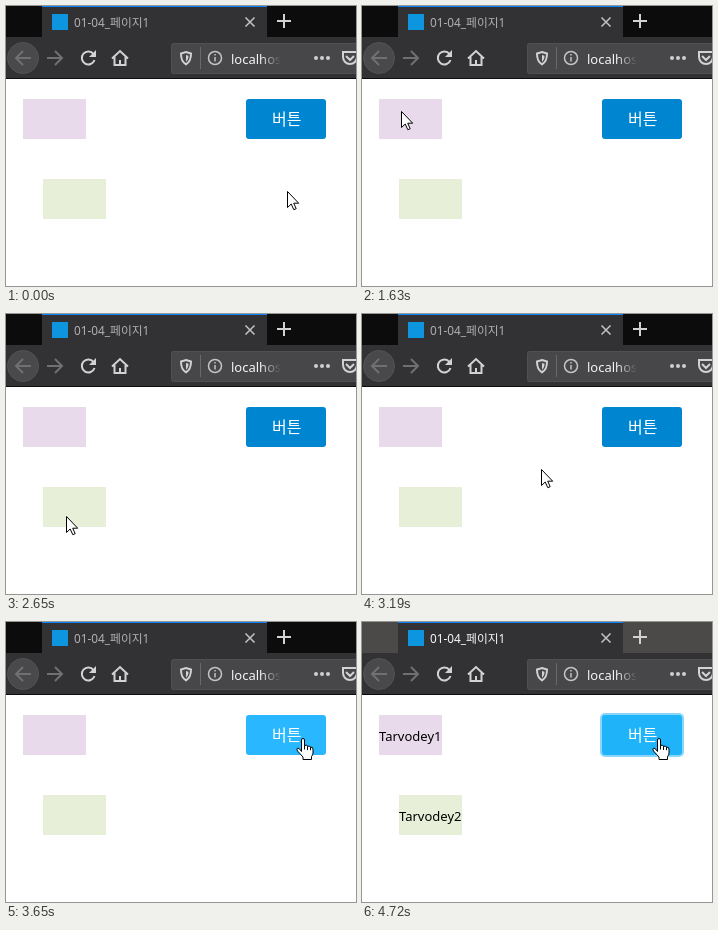
An HTML page for the animation above (6830 ms loop, 350 by 280 pixels).

```html
<!DOCTYPE html>
<html lang="ko">
<head>
<meta charset="utf-8">
<style>
  html, body { margin: 0; width: 100%; height: 100%; overflow: hidden; background: #fff; }
  svg { display: block; width: 350px; height: 280px; }
  text { font-family: "Noto Sans", "Noto Sans CJK KR", "Noto Sans CJK", sans-serif; font-size: 13px; }
  #title { font-size: 11.8px; }
  #caption { font: 16px "Noto Sans CJK KR", "Noto Sans CJK", sans-serif; }
  .icon { fill: none; stroke: #d2d2d4; stroke-width: 2; }
  .dim { stroke: #707072; }
  .thin { stroke: #c4c4c6; stroke-width: 1.5; }
</style>
</head>
<body>
<svg viewBox="0 0 350 280">
  <defs>
    <linearGradient id="fade" gradientUnits="userSpaceOnUse" x1="254" x2="275">
      <stop stop-color="#f4f4f5"/>
      <stop offset="1" stop-color="#f4f4f5" stop-opacity="0"/>
    </linearGradient>
  </defs>

  <!-- tab strip -->
  <rect id="strip" width="350" height="31"/>
  <rect x="36" width="225" height="31" fill="#323234"/>
  <rect x="36" width="225" height="1" fill="#0a84ff"/>
  <rect x="46" y="8" width="16" height="16" fill="#0d95e0"/>
  <text id="title" x="68" y="20.5">01-04_페이지1</text>
  <path class="icon thin" d="M239.5 11.5l9 9m0-9l-9 9"/>
  <path class="icon" d="M271 15h14m-7-7v14"/>

  <!-- toolbar -->
  <rect y="31" width="350" height="41" fill="#323234"/>
  <rect y="72" width="350" height="1" fill="#0c0c0d"/>
  <circle cx="17" cy="52" r="15.5" fill="#49494b" stroke="#535355"/>
  <path class="icon dim" d="M25 52H10m7-7l-7 7 7 7"/>
  <path class="icon dim" d="M41 52h15m-7-7l7 7-7 7"/>
  <path class="icon" d="M87.5 48a6.5 6.5 0 1 0 1 6"/>
  <path d="M90 44v7h-7z" fill="#d2d2d4"/>
  <path class="icon" d="M106 52.5l8-7.5 8 7.5M108.5 51v8h11v-8M114 59v-5"/>
  <rect x="165.5" y="37.5" width="200" height="30" rx="2" fill="#474749" stroke="#505052"/>
  <path class="icon" d="M180 46l5 1.5c0 6-1.2 8.500-5 10.800-3.800-2.300-5-4.800-5-10.800z"/>
  <path d="M180 49l2.500.8c0 3-.8 4.500-2.500 6z" fill="#d2d2d4"/>
  <path d="M194.5 41v22" stroke="#69696b"/>
  <circle class="icon thin" cx="209" cy="52" r="6.5"/>
  <path class="icon thin" d="M209 51v4.500m0-7.500v1.500"/>
  <text x="225" y="57.5" fill="url(#fade)">localhos</text>
  <g fill="#cfcfd1">
    <circle cx="310" cy="52" r="2"/><circle cx="316" cy="52" r="2"/><circle cx="322" cy="52" r="2"/>
  </g>
  <path class="icon" d="M337 46h14v5a7 7 0 0 1-14 0zM340 50l4 4 4-4"/>

  <!-- page -->
  <rect x="17" y="93" width="63" height="40" fill="#e9daeb"/>
  <rect x="37" y="173" width="63" height="40" fill="#e7efd8"/>
  <g id="labels">
    <text x="17" y="118.5">Tarvodey1</text>
    <text x="37" y="198.5">Tarvodey2</text>
  </g>
  <rect id="ring" x="238" y="91" width="84" height="44" rx="5" fill="#8ad6fb"/>
  <rect id="button" x="240" y="93" width="80" height="40" rx="3"/>
  <text id="caption" x="280.7" y="119" fill="#fff" text-anchor="middle">버튼</text>

  <!-- pointer, with its hot spot at 0,0 -->
  <g id="pointer" fill="#fff" stroke="#000" stroke-linejoin="round">
    <path id="arrow" d="M.5.5v16l3.700-3.500 2.600 5.700 2.400-1-2.500-5.500h5z"/>
    <path id="hand" d="M-1.500 13.500V2q0-1.500 1.500-1.500T1.500 2v5.500q3-1 3 .8 2.800-.8 3 .9 2.500-.4 2.500 1.800v4q0 2-1.500 3.500v3H0v-2.500l-5.500-6q-1.500-2.500.2-3 1.200-.2 3.800 3.500zM1.500 7.500v4m3-3.200v3.700m3-2.800v3"/>
  </g>
  <circle id="press" cx="298" cy="117" r="12" fill="#ff0" fill-opacity=".5"/>
</svg>
<script>
const LOOP = 6830;
const el = id => document.getElementById(id);
const show = (id, on) => el(id).setAttribute("visibility", on ? "visible" : "hidden");
const clamp = v => Math.min(1, Math.max(0, v));
const mix = (a, b, p) => a + (b - a) * p;
const ease = p => { p = clamp(p); return p * p * (3 - 2 * p); };

const stepAt = (t, start, end, n) =>
  t < start ? 0 : Math.min(n, 1 + Math.floor((t - start) / (end - start) * (n - 1) + 1e-6));

const mixColor = (a, b, p) => `rgb(${a.map((v, i) => Math.round(mix(v, b[i], p)))})`;
const IDLE = [0, 134, 209], HOVER = [41, 184, 255], FOCUS = [31, 179, 250];

function draw(t) {
  const hoverStep = stepAt(t, 3030, 3650, 9);
  const moves = [
    [39, 105, ease(stepAt(t, 1160, 1630, 7) / 7)],
    [60, 202, ease(stepAt(t, 2330, 2650, 5) / 5)],
    [297, 116, ease(hoverStep / 6)],
  ];
  let x = 281, y = 185;
  for (const [toX, toY, p] of moves) {
    x = mix(x, toX, p);
    y = mix(y, toY, p);
  }
  const travel = moves[2][2];
  y -= 16 * travel * (1 - travel);
  el("pointer").setAttribute("transform", `translate(${Math.round(x)} ${Math.round(y)})`);

  const over = hoverStep >= 5;
  show("arrow", !over);
  show("hand", over);

  const active = t >= 4580, released = t >= 4720;
  const focus = stepAt(t, 4580, 4720, 3);
  el("strip").setAttribute("fill", active ? "#4c4a48" : "#0c0c0d");
  el("title").setAttribute("fill", active ? "#f9f9fa" : "#b1b1b3");
  el("button").setAttribute("fill", active
    ? mixColor(HOVER, FOCUS, focus / 3)
    : mixColor(IDLE, HOVER, clamp((hoverStep - 5) / 4)));
  el("ring").setAttribute("opacity", clamp((focus - 1) / 2));
  show("press", active && !released);
  show("labels", released);
}

function tick() {
  draw(performance.now() % LOOP);
  requestAnimationFrame(tick);
}
tick();
</script>
</body>
</html>
```
